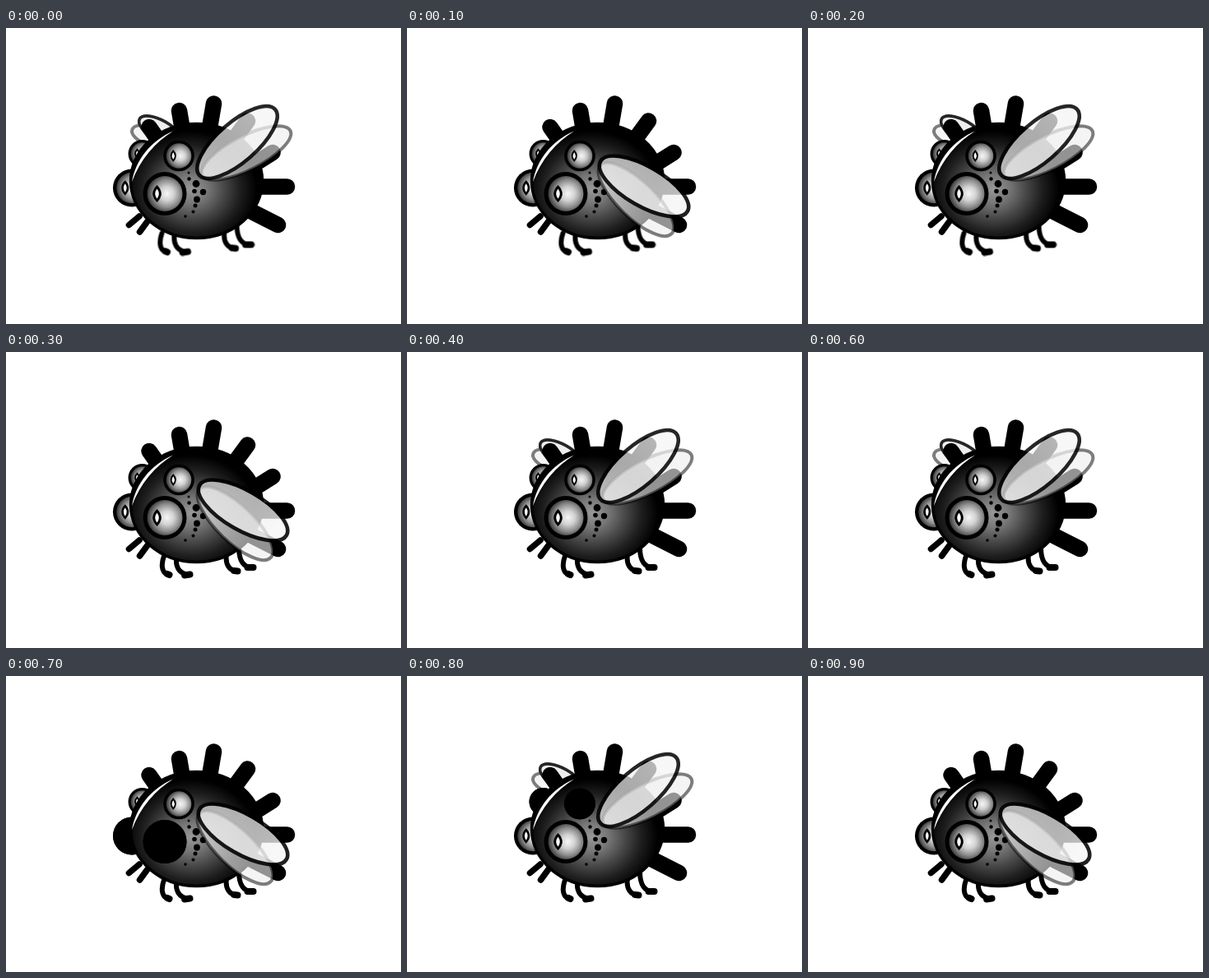
An HTML page for the animation above (1 s loop, 480 by 360 pixels).

```html
<!DOCTYPE html>
<html lang="en">
<head>
<meta charset="utf-8">
<title>Fly</title>
<style>
html, body { margin: 0; width: 100%; height: 100%; overflow: hidden; background: #fff; }
svg { display: block; width: 480px; height: 360px; }
.up, .down { animation: flap 200ms step-end infinite; }
.down { animation-delay: -100ms; }
.legs-a, .legs-b, .shut-big, .shut-small { animation: 1000ms step-end infinite; }
.legs-a { animation-name: legsA; }
.legs-b { animation-name: legsB; }
.shut-big { animation-name: shutBig; }
.shut-small { animation-name: shutSmall; }
@keyframes flap { 0% { opacity: 1 } 50%, 100% { opacity: 0 } }
@keyframes legsA { 0% { opacity: 1 } 30%, 100% { opacity: 0 } }
@keyframes legsB { 0% { opacity: 0 } 30%, 100% { opacity: 1 } }
@keyframes shutBig { 0% { opacity: 0 } 70% { opacity: 1 } 80%, 100% { opacity: 0 } }
@keyframes shutSmall { 0% { opacity: 0 } 80% { opacity: 1 } 90%, 100% { opacity: 0 } }
.line { fill: none; stroke: #000; stroke-linecap: round; stroke-linejoin: round; }
.ghost { fill: #eee; fill-opacity: .62; stroke: #000; stroke-opacity: .5; stroke-width: 4; }
</style>
</head>
<body>
<svg viewBox="0 0 480 360">
  <defs>
    <radialGradient id="skin" gradientUnits="userSpaceOnUse" cx="0" cy="0" r="80" gradientTransform="translate(225 196) scale(1 .88)">
      <stop offset="0" stop-color="#989898"/>
      <stop offset=".25" stop-color="#767676"/>
      <stop offset=".5" stop-color="#484848"/>
      <stop offset=".75" stop-color="#1e1e1e"/>
      <stop offset="1" stop-color="#000"/>
    </radialGradient>
    <radialGradient id="ball" cx=".56" cy=".5" r=".56">
      <stop offset="0" stop-color="#f6f6f6"/>
      <stop offset=".35" stop-color="#d2d2d2"/>
      <stop offset=".7" stop-color="#8a8a8a"/>
      <stop offset="1" stop-color="#363636"/>
    </radialGradient>
    <linearGradient id="film">
      <stop offset="0" stop-color="#ececec" stop-opacity=".78"/>
      <stop offset="1" stop-color="#f6f6f6" stop-opacity=".9"/>
    </linearGradient>
    <ellipse id="wing" rx="61" ry="24" fill="url(#film)" stroke="#000" stroke-width="4.600"/>
    <g id="eye">
      <circle r="26.500"/>
      <circle r="21.500" fill="url(#ball)"/>
      <path d="M-9.500 -10.500Q1 0 -9.500 10.500Q-20 0 -9.500 -10.500Z"/>
      <path d="M-9.500 -6Q-5 0 -9.500 6Q-14 0 -9.500 -6Z" fill="#fff"/>
    </g>
    <g id="legs" class="line">
      <path stroke-width="6" d="M192 248C187 262 191 270 198 271M207 251C206 264 213 271 223 270.500M268 246C266 259 272 266 281 266.500M283 238C283 254 289 262 299 262"/>
      <path stroke-width="8" d="M196 270L198.500 271M217 271.500L223.500 270.500M277 266L281.500 266.500M293.500 262L300.500 262"/>
    </g>
  </defs>

  <g class="up">
    <ellipse class="ghost" rx="22" ry="11" transform="translate(174 131) rotate(20)"/>
    <ellipse rx="29" ry="12.500" transform="translate(187.500 125) rotate(30)" fill="#eee" stroke="#262626" stroke-width="3.600"/>
  </g>

  <path class="line" stroke-width="19.500" d="M187 139L174 120.500M215.500 130L210.500 100.500M246 130L252.500 92M273 141L293.500 113M293 171L324 151.500M298 193H341.500M298 223L330.500 239.500"/>
  <path class="line" stroke-width="7.500" d="M162 229L149.500 239.500M172 235L162.500 248"/>

  <use class="legs-a" href="#legs" x="-2.500" y="1.500"/>
  <use class="legs-b" href="#legs"/>

  <use href="#eye" transform="translate(153 194.500) scale(.87)"/>
  <use href="#eye" transform="translate(165.500 153) scale(.64)"/>
  <circle class="shut-big" cx="153" cy="194.500" r="23"/>
  <circle class="shut-small" cx="165.500" cy="153" r="17"/>

  <ellipse cx="231.500" cy="186" rx="80" ry="69.500" fill="url(#skin)" stroke="#000" stroke-width="3.500"/>
  <path fill="#fff" d="M153 187C158 160 176 137 203 125.500C181 139 163 160 153 187Z"/>

  <g id="dots"></g>

  <use href="#eye" transform="translate(193 201.500)"/>
  <use href="#eye" transform="translate(210 155.500) scale(.71)"/>
  <circle class="shut-big" cx="193" cy="201.500" r="26.500"/>
  <circle class="shut-small" cx="210" cy="155.500" r="19"/>

  <g class="up">
    <ellipse class="ghost" rx="60" ry="20.500" transform="translate(292 152) rotate(-27)"/>
    <use href="#wing" transform="translate(281 139) rotate(-41)" opacity=".85"/>
  </g>
  <g class="down">
    <ellipse class="ghost" rx="60" ry="22" transform="translate(278.500 208.500) rotate(44)"/>
    <use href="#wing" transform="translate(288 192.500) rotate(30)" opacity=".87"/>
  </g>
</svg>
<script>
const spots = [
  [222, 176, 1.5], [222.5, 183.5, 2.2], [231, 189.5, 4.4], [239.5, 199.5, 3.7],
  [229, 198.5, 2.8], [232, 208.5, 3.9], [230, 216, 2.5], [227.5, 223.5, 2], [218, 229, 1.8]
];
document.getElementById("dots").innerHTML =
  spots.map(([x, y, r]) => `<circle cx="${x}" cy="${y}" r="${r}"/>`).join("");
</script>
</body>
</html>
```
